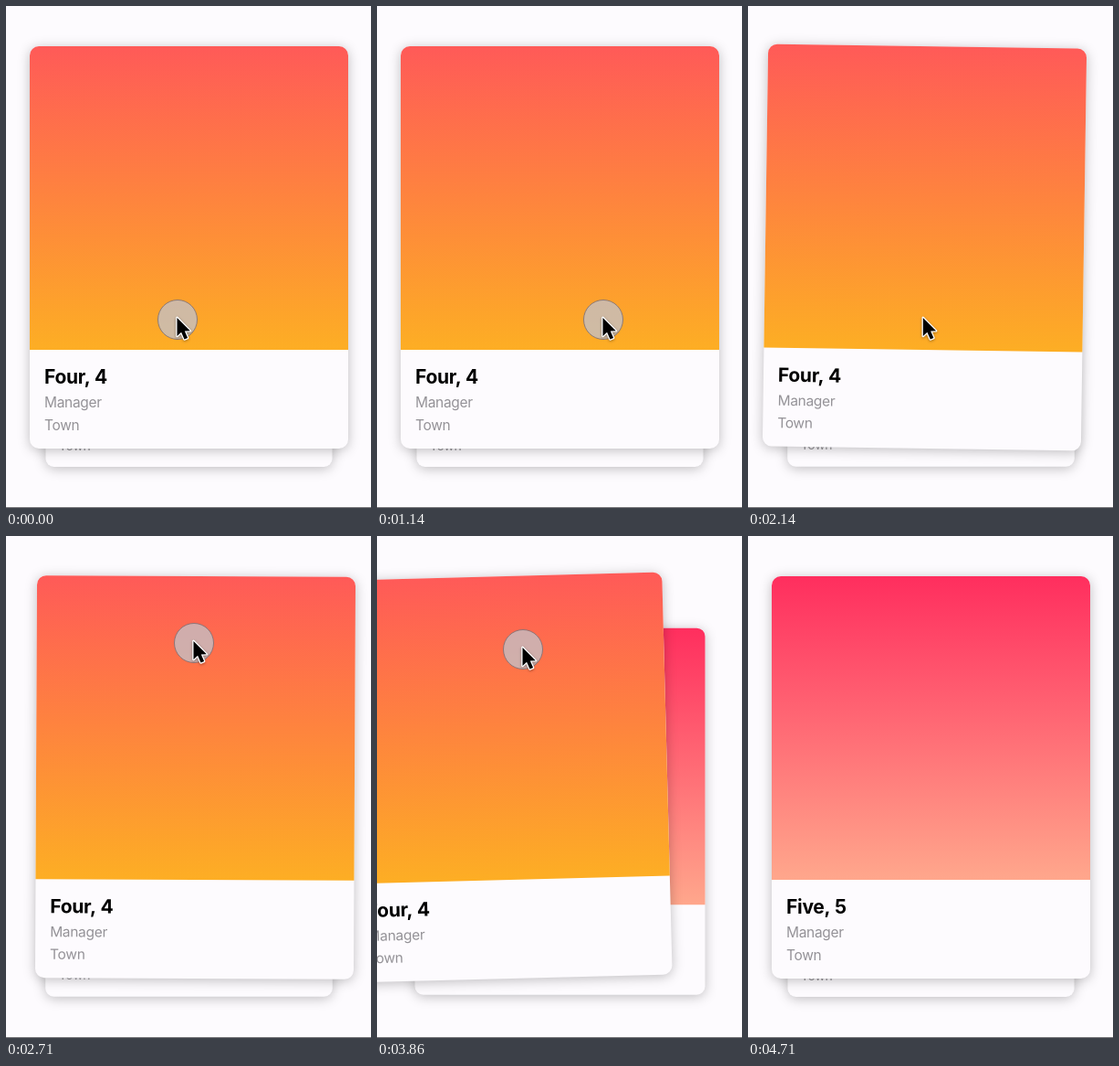
Animation of 400 by 549 pixels, one loop 4.85 s. Source, as an HTML page with a canvas:

```html
<!DOCTYPE html>
<html lang="en">
<head>
<meta charset="utf-8">
<title>Card swipe</title>
<style>
  html, body { margin: 0; width: 100%; height: 100%; overflow: hidden; background: #fdfbfe; }
  canvas { display: block; }
</style>
</head>
<body>
<canvas id="stage" width="400" height="549"></canvas>
<script>
const ctx = document.getElementById('stage').getContext('2d');
const LOOP = 4850, STEP = 1000 / 7;
const W = 349, H = 440, PHOTO = 332, CX = 200.5, CY = 264;
const PAPER = '#fdfbfe';

const FOUR = { title: 'Four, 4', top: '#ff5a58', bottom: '#fdae24' };
const FIVE = { title: 'Five, 5', top: '#ff2e5e', bottom: '#ffa78c' };

// Keys are [step, value]; one step is a seventh of a second.
const DRAG = [[0, 0], [1, 0], [2, 6], [4, 30], [5, 37], [6, 36], [7, 10], [8, 0],
  [9, -3], [11, -28], [12, -31], [13, -31], [14, -21], [15, -7], [16, 0],
  [18, 0], [19, 7], [21, 30], [22, 30], [23, 8], [24, 0],
  [25, -3], [26, -25], [27, -57], [28, -100], [29, -240], [30, -430]];
const TILT = [[0, 0], [1, 0], [5, -.0175], [6, -.017], [7, -.013], [8, 0],
  [9, .001], [11, .0144], [14, .0155], [15, .0144], [16, 0],
  [18, 0], [21, .0145], [22, .0145], [23, .01], [24, 0],
  [25, -.002], [27, -.026], [28, -.036], [30, -.04]];
const RISE = [[28, .2], [29, .48], [30, .78], [31, .94], [32, .99], [33, 1]];
const POINT_X = [[0, 188], [1, 193], [2, 208], [4, 240], [5, 248], [8, 248],
  [9, 240], [11, 196], [13, 193], [16, 192], [18, 192], [19, 206], [21, 246],
  [22, 248], [24, 248], [25, 240], [27, 160], [28, 110], [30, -30]];
const POINT_Y = [[15, 343], [17, 125], [18, 117], [23, 117], [25, 124]];
const TOUCHES = [[0, 5], [8, 13], [18, 21], [25, 28]];

function at(keys, k) {
  const i = keys.findIndex(key => key[0] >= k);
  if (i < 0) return keys[keys.length - 1][1];
  if (i === 0) return keys[0][1];
  const [k0, v0] = keys[i - 1], [k1, v1] = keys[i];
  return v0 + (v1 - v0) * (k - k0) / (k1 - k0);
}

function label(text, y, font, color, spacing) {
  ctx.font = font;
  ctx.fillStyle = color;
  ctx.letterSpacing = spacing;
  ctx.fillText(text, 16, y);
}

function drawCard(card, { dx = 0, dy = 0, scale = 1, tilt = 0, alpha = 1 }) {
  ctx.save();
  ctx.globalAlpha = alpha;
  ctx.translate(CX + dx, CY + dy);
  ctx.rotate(tilt);
  ctx.scale(scale, scale);
  ctx.translate(-W / 2, -H / 2);

  ctx.beginPath();
  ctx.roundRect(0, 0, W, H, 10);
  ctx.save();
  ctx.shadowColor = 'rgba(0,0,0,.25)';
  ctx.shadowBlur = 13;
  ctx.shadowOffsetY = 2;
  ctx.fillStyle = PAPER;
  ctx.fill();
  ctx.restore();

  const shade = ctx.createLinearGradient(0, 0, 0, PHOTO);
  shade.addColorStop(0, card.top);
  shade.addColorStop(1, card.bottom);
  ctx.fillStyle = shade;
  ctx.beginPath();
  ctx.roundRect(0, 0, W, PHOTO, [10, 10, 0, 0]);
  ctx.fill();

  label(card.title, 369, '700 21px Inter, sans-serif', '#000', '-0.3px');
  label('Manager', 395, '400 15.5px Inter, sans-serif', '#949297', '-0.3px');
  label('Town', 419.5, '400 15.5px Inter, sans-serif', '#949297', '-0.3px');
  ctx.restore();
}

// A card waiting in the deck; p = 1 brings it to the front.
function drawWaiting(card, p, alpha = 1) {
  drawCard(card, { dy: 42 * (1 - p), scale: .9 + .1 * p, alpha });
}

function drawTouch(x, y) {
  ctx.beginPath();
  ctx.arc(x, y, 21.5, 0, Math.PI * 2);
  ctx.fillStyle = 'rgba(195,192,199,.78)';
  ctx.fill();
  ctx.lineWidth = 1;
  ctx.strokeStyle = 'rgba(125,112,118,.85)';
  ctx.stroke();
}

function drawArrow(x, y) {
  const outline = [[0, 0], [0, 20], [4.6, 15.8], [8, 23.5], [11.6, 22], [8.3, 14.5], [14.3, 14.3]];
  ctx.save();
  ctx.translate(x, y);
  ctx.beginPath();
  outline.forEach(p => ctx.lineTo(...p));
  ctx.closePath();
  ctx.lineJoin = 'round';
  ctx.lineWidth = 2.6;
  ctx.strokeStyle = '#fff';
  ctx.shadowColor = 'rgba(0,0,0,.35)';
  ctx.shadowBlur = 3;
  ctx.shadowOffsetY = 1;
  ctx.stroke();
  ctx.shadowColor = 'transparent';
  ctx.fillStyle = '#000';
  ctx.fill();
  ctx.restore();
}

function draw(k) {
  ctx.fillStyle = PAPER;
  ctx.fillRect(0, 0, 400, 549);

  const dx = at(DRAG, k);
  const rise = k < 28 ? Math.abs(dx) / 500 : at(RISE, k);
  if (k > 28) drawWaiting(FOUR, 0, Math.min(1, (k - 28) / 3));
  drawWaiting(FIVE, rise);
  if (k < 31) drawCard(FOUR, { dx, tilt: at(TILT, k) });

  ctx.fillStyle = '#747277';
  ctx.fillRect(0, 548, 400, 1);

  if (k < 31) {
    const x = at(POINT_X, k), y = at(POINT_Y, k);
    if (TOUCHES.some(([on, off]) => k >= on && k <= off)) drawTouch(x, y);
    drawArrow(x - .5, y - 2);
  }
}

const start = performance.now();
function tick() {
  const t = (performance.now() - start) % LOOP;
  // The picture holds between steps, which fall on whole hundredths of a second.
  draw(Math.floor((Math.floor(t / 10) * 10 + 5) / STEP));
  requestAnimationFrame(tick);
}
tick();
</script>
</body>
</html>
```
